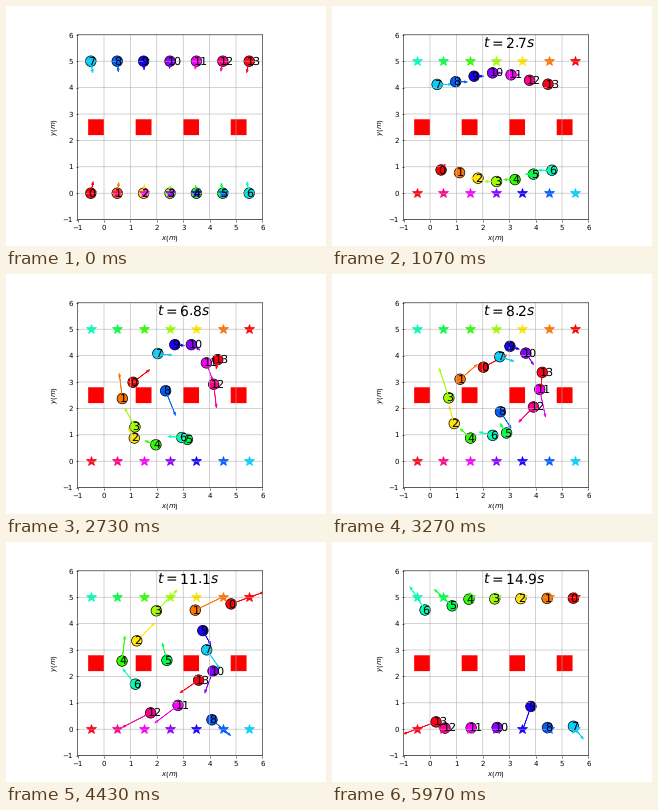
Animation of 320x240 px, one loop 6010 ms. Source, as a matplotlib script:

```python
import matplotlib.pyplot as plt
import numpy as np
from matplotlib.animation import FuncAnimation
from matplotlib.patches import Circle, Rectangle

plt.rcParams.update({"path.snap": False, "text.hinting": "none"})

N, ROW = 14, 7
STEPS, DT = 150, 0.1
FRAMES, LOOP_MS = 2 * STEPS, 6010
RADIUS = 0.2
SQUEEZE_END = 2.7   # time at which both rows have closed up
WALL_Y = 2.5

# Gaps in the wall: x, first passing time, time between robots, exit speed, order
GATES = [
    (0.68, 5.6, 1.35, 0.9, (0, 1, 3, 2, 4, 6)),
    (2.4, 7.0, 3.9, 0.7, (8, 5)),
    (4.2, 7.3, 1.13, 0.9, (12, 11, 13, 10, 7, 9)),
]


def start(i):
    """Two rows of seven, facing each other."""
    return np.array([i % ROW - 0.5, 5.0 * (i // ROW)])


def goal(i):
    return start(N - 1 - i)


def queue_spot(i):
    """Place in the narrowed, wavy row that forms before the wall."""
    col, top = i % ROW, i // ROW
    inset = 0.66 + 0.22 * np.cos(col)
    return np.array([0.42 - 0.15 * top + 0.7 * col, 5 - inset if top else inset])


def plan(i, gate_x, gate_t, speed):
    """Legs (t0, t1, from, to, exponents): close up, queue, leave."""
    spot, gate = queue_spot(i), np.array([gate_x, WALL_Y])
    way = goal(i) - gate
    dist = np.hypot(*way)
    stop = goal(i) - 0.08 * way / dist
    wait = gate_t - SQUEEZE_END
    return [
        (0, SQUEEZE_END, start(i), spot, (1.5, 1)),
        (SQUEEZE_END, gate_t, spot, gate, (1, wait / 2)),
        (gate_t, gate_t + dist / speed, gate, stop, (1.5, 1)),
    ]


def position(legs, t):
    t0, t1, a, b, power = next((leg for leg in legs if t < leg[1]), legs[-1])
    u = min((t - t0) / (t1 - t0), 1)
    return a + (b - a) * u ** np.array(power)


plans = {}
for gate_x, first, gap, speed, order in GATES:
    for rank, i in enumerate(order):
        plans[i] = plan(i, gate_x, first + gap * rank, speed)

fig, ax = plt.subplots(figsize=(6.4, 4.8), dpi=50)
ax.set(xlim=(-1, 6), ylim=(-1, 6), aspect="equal",
       xticks=range(-1, 7), yticks=range(-1, 7),
       xlabel="$x(m)$", ylabel="$y(m)$")
ax.grid(True)

for k in range(4):
    ax.add_patch(Rectangle((1.8 * k - 0.6, 2.2), 0.6, 0.6, color="red", lw=0))

cmap = plt.get_cmap("hsv", N)
discs, arrows, labels = [], [], []
for i in range(N):
    color = cmap(i)
    discs.append(ax.add_patch(Circle(start(i), RADIUS, fc=color, ec="k")))
    arrows.append(ax.arrow(*start(i), 0.1, 0.1, width=0.001, head_width=0.08,
                           head_length=0.12, color=color))
    ax.plot(*goal(i), "*", color=color, ms=15, zorder=1)
    labels.append(ax.text(0, 0, str(i), fontsize=16))
clock = ax.text(2, 5.5, "", fontsize=20)


def update(n):
    step = min((n + 1) // 2, STEPS - 1)
    t = step * DT
    for i in range(N):
        x, y = position(plans[i], t)
        vx, vy = (position(plans[i], t + DT) - (x, y)) / DT
        discs[i].center = x, y
        arrows[i].set_data(x=x, y=y, dx=vx, dy=vy)
        labels[i].set_position((x - 0.1, y - 0.13))
    clock.set_text(f"$t={t:.1f}s$" if step else "")
    return [*discs, *arrows, *labels, clock]


anim = FuncAnimation(fig, update, frames=FRAMES, interval=LOOP_MS / FRAMES,
                     repeat=True, repeat_delay=0, blit=False)
plt.show()
```
